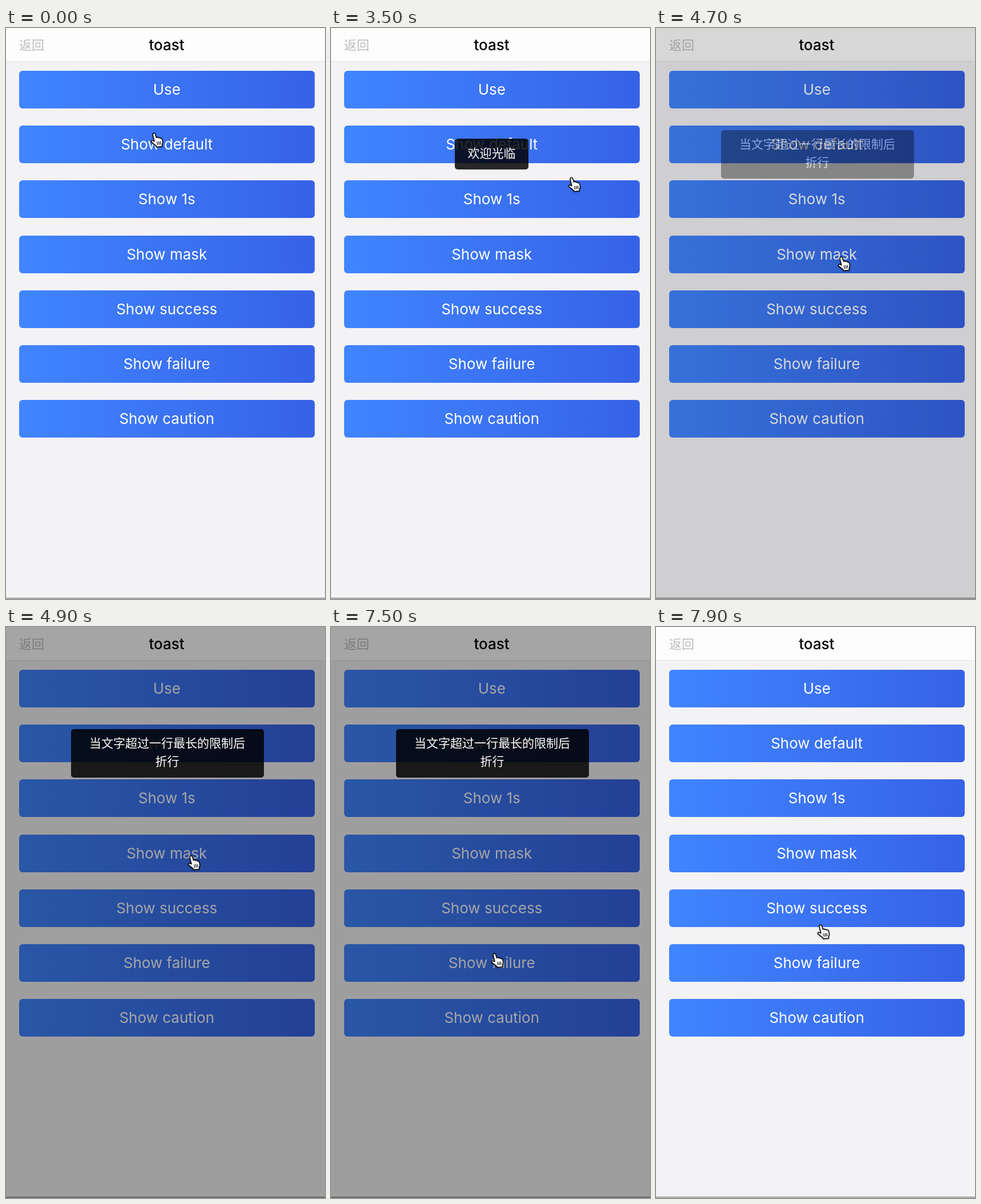
These frames come from a looping animation (559x1001 px, 8 s). An HTML page:

```html
<!DOCTYPE html>
<html lang="zh">
<head>
<meta charset="utf-8">
<title>toast</title>
<style>
  html, body { margin: 0; width: 100%; height: 100%; overflow: hidden; background: #f3f2f4; }
  #stage { position: relative; width: 559px; height: 1001px; overflow: hidden; background: #f3f2f4; }
  #stage > * { position: absolute; box-sizing: border-box; }
  header {
    left: 0; top: 0; width: 559px; height: 59px;
    background: #fefdfe; border-bottom: 1px solid #e4e3e5;
  }
  header * { position: absolute; white-space: nowrap; }
  h1 {
    left: 0; top: 0; width: 563px; margin: 0; text-align: center;
    font: 500 26px/60px Inter, sans-serif; color: #000;
  }
  .back { left: 23px; top: 0; font: 500 22px/57px "Noto Sans CJK SC", "Noto Sans CJK", sans-serif; color: #bdbcbe; }
  .btn {
    left: 22.5px; width: 518.5px; height: 66px; border-radius: 6px;
    background: linear-gradient(90deg, #4085ff, #3662e6);
    font: 400 26px/66px Inter, sans-serif; color: #fff; text-align: center;
  }
  .edge { left: 0; top: 999px; width: 559px; height: 1px; background: #555; }
  .mask { left: 0; top: 0; width: 559px; height: 1001px; background: rgba(0, 0, 0, .35); opacity: 0; }
  .toast {
    border-radius: 5px; background: rgba(0, 0, 0, .84); color: #fff; text-align: center; opacity: 0;
    font: 400 21px/31.5px "Noto Sans CJK SC", "Noto Sans CJK", sans-serif; white-space: nowrap;
  }
  #hello { left: 217px; top: 194px; width: 129px; height: 54px; padding-top: 9px; }
  #wrap { left: 113.5px; top: 178.5px; width: 338px; height: 85.5px; padding-top: 8.5px; }
  #hand { left: 0; top: 0; overflow: visible; filter: drop-shadow(0 1px 1px rgba(0, 0, 0, .35)); }
</style>
</head>
<body>
<div id="stage">
  <header><span class="back">返回</span><h1>toast</h1></header>
  <div class="edge"></div>
  <div class="mask" id="mask"></div>
  <div class="toast" id="hello">欢迎光临</div>
  <div class="toast" id="wrap">当文字超过一行最长的限制后<br>折行</div>
  <svg id="hand" width="23" height="27" stroke="#000" stroke-linejoin="round" stroke-linecap="round">
    <path fill="#fff" stroke-width="1.5" d="M4.5 2.2C5.5 .8 8 1 8.6 3L10.6 9.2C11 8 13.5 8 14 9.6C14.8 8.6 16.8 8.9 17.2 10.6C18.2 9.8 20 10.2 20.5 12C21.5 14.5 22 17 21.2 19.5L20.4 22L20.6 24.8L11 25.6L10.6 24C8 22 5 19.5 2 17.2C.8 15.8 2 13.8 4 14.4L7 15.8L4.2 4.5Z"/>
    <path fill="none" stroke-width="1.2" d="M11.8 16.5l.8 5M14.7 16.2l.6 5M17.4 16l.4 4.8"/>
  </svg>
</div>
<script>
  const LOOP = 8000, STEP = 100, FADE = 200;
  const $ = id => document.getElementById(id);
  const clamp = v => Math.max(0, Math.min(1, v));
  const ease = p => p * p * (3 - 2 * p);

  ["Use", "Show default", "Show 1s", "Show mask", "Show success", "Show failure", "Show caution"]
    .forEach((label, i) => {
      const b = document.createElement("div");
      b.className = "btn";
      b.textContent = label;
      b.style.top = 75 + 96.2 * i + "px";
      $("stage").insertBefore(b, $("mask"));
    });

  // pointer stops: time, x, y
  const path = [
    [0, 253, 183], [700, 253, 183], [1300, 388, 247], [2700, 388, 247],
    [3300, 415, 261], [3600, 415, 261], [4400, 318, 400], [5300, 318, 400],
    [6300, 280, 571], [7500, 280, 571], [7900, 282, 521], [LOOP, 282, 521]
  ];
  // element, fade-in start, fade-out start
  const fades = [["hello", 615, 3635], ["mask", 4615, 7635], ["wrap", 4615, 7635]];

  function pointer(t) {
    const i = path.findIndex((p, n) => n > 0 && t < p[0]);
    const [t0, x0, y0] = path[i - 1], [t1, x1, y1] = path[i];
    const p = ease((t - t0) / (t1 - t0));
    return [x0 + (x1 - x0) * p, y0 + (y1 - y0) * p];
  }

  function draw(now) {
    const t = Math.floor(now % LOOP / STEP) * STEP;
    const [x, y] = pointer(t);
    $("hand").style.transform = `translate(${x}px, ${y}px)`;
    for (const [id, on, off] of fades)
      $(id).style.opacity = clamp((t - on) / FADE) - clamp((t - off) / FADE);
  }

  const start = performance.now();
  function tick() {
    draw(performance.now() - start);
    requestAnimationFrame(tick);
  }
  tick();
</script>
</body>
</html>
```
